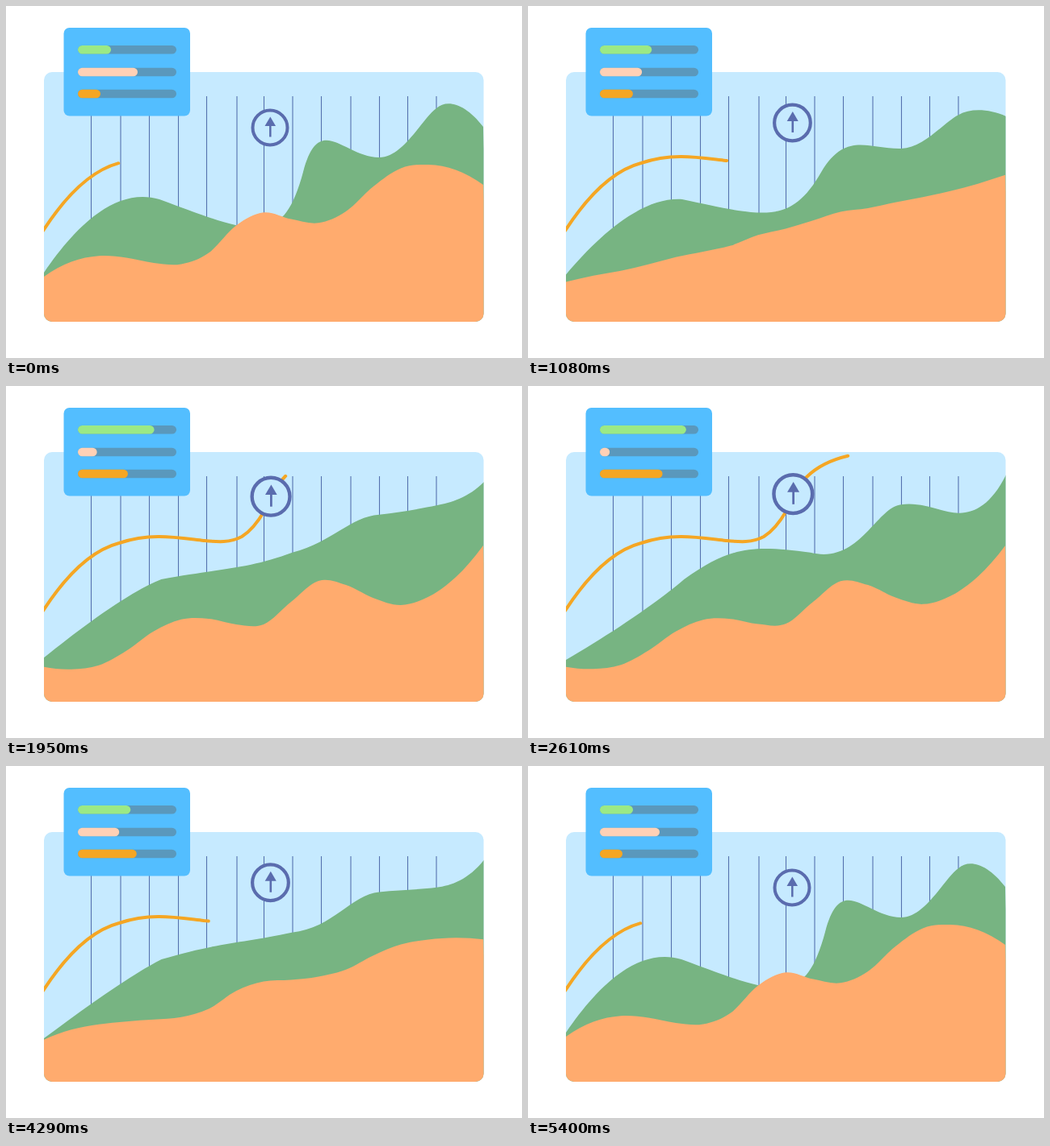
Animation, 639 px wide and 437 px high, one loop 5430 ms. Source, as an HTML page:

```html
<!DOCTYPE html>
<html lang="en">
<head>
<meta charset="utf-8">
<title>Area chart</title>
<style>
  html, body { margin: 0; width: 100%; height: 100%; overflow: hidden; background: #fff; }
  svg { display: block; width: 639px; height: 437px; }
</style>
</head>
<body>
<svg viewBox="0 0 639 437">
  <clipPath id="card"><rect x="47" y="82" width="544.5" height="310" rx="10"/></clipPath>
  <g clip-path="url(#card)">
    <rect x="47" y="82" width="545" height="310" fill="#c6eaff"/>
    <path id="grid" stroke="#5572ae" stroke-width="1.1"/>
    <path id="green" fill="#77b482"/>
    <path id="orange" fill="#ffab6e"/>
    <path id="line" fill="none" stroke="#f5a623" stroke-width="4" stroke-linecap="round"
      d="M46 279C75 234 106 204 140 195C180 182 210 188 245 192C262 193.5 277 195 292 187C305 179 313 167 320 155C328 139 336 122 345 113C357 101 373 92 397 86.5"/>
  </g>
  <g id="badge" stroke="#5a6cae" fill="#5a6cae">
    <circle r="21.5" fill="#c6eaff" stroke-width="4"/>
    <path d="M.3 11.5V-4" stroke-width="2.5"/>
    <path d="M-6.5 -2L.3 -13.5L7 -2Z" stroke="none"/>
  </g>
  <rect x="71.5" y="27" width="156.5" height="109.5" rx="7" fill="#53beff"/>
  <g id="bars"></g>
</svg>
<script>
const CYCLE = 5400, LOOP = 5430;
const $ = id => document.getElementById(id);
const mix = (a, b, w) => a + (b - a) * w;

// Rises from 0 to 1 at `peak`, then returns to 0 at the end of the cycle.
function swing(t, peak) {
  const s = Math.max(0, t < peak ? t / peak : (CYCLE - t) / (CYCLE - peak));
  return s * s * (3 - 2 * s);
}

$('grid').setAttribute('d',
  [105.5, 142, 177.5, 213.5, 248.5, 286, 319.5, 355, 390.5, 427, 462.5, 497.5, 533]
    .map(x => `M${x} 112V320`).join(''));

// Bezier points of the back hill in its two poses: x, y, x, y, ...
const hillA = [47, 331, 85, 275, 135, 224, 190, 240, 310, 285, 343, 299, 368, 206,
  388, 130, 418, 188, 462, 188, 492, 188, 515, 140, 533, 127, 546, 115, 569, 121, 591, 150];
const hillB = [47, 342, 100, 318, 160, 282, 194, 240, 238, 182, 264, 176, 346, 207,
  415, 241, 434, 143, 462, 139, 487, 134, 513, 161, 533, 164, 556, 167, 578, 151, 597, 92];

// Heights of the front hill at even steps in its two poses.
const STEP = 34;
const frontA = [336, 317.5, 310.3, 312.5, 319, 320.5, 306.5, 272.5, 256.3, 264.5, 269.3,
  255, 224, 201.5, 197, 203.5, 222];
const frontB = [349.3, 352.8, 348, 329.3, 304, 288.7, 288.3, 296.7, 297.3, 268.2, 241,
  246.7, 264.5, 274.3, 264, 238.5, 197.2];

const close = 'L600 400H47Z';

function backHill(w) {
  const p = hillA.map((v, i) => mix(v, hillB[i], w).toFixed(2));
  return `M${p.slice(0, 2)}C${p.slice(2)}${close}`;
}

function frontHill(w) {
  const y = frontA.map((v, i) => mix(v, frontB[i], w));
  const last = y.length - 1;
  const slope = i =>
    i === 0 ? (4 * y[1] - 3 * y[0] - y[2]) / 6 :
    i === last ? (3 * y[last] - 4 * y[last - 1] + y[last - 2]) / 6 :
    (y[i + 1] - y[i - 1]) / 6;
  let d = `M47 ${y[0]}`;
  for (let i = 0; i < last; i++) {
    const x = 47 + i * STEP;
    d += `C${x + STEP / 3} ${y[i] + slope(i)} ${x + STEP * 2 / 3} ${y[i + 1] - slope(i + 1)} ${x + STEP} ${y[i + 1]}`;
  }
  return d + close;
}

function addBar(y, width, fill) {
  const bar = document.createElementNS('http://www.w3.org/2000/svg', 'rect');
  const attrs = { x: 89, y: y - 5.3, width, height: 10.6, rx: 5.3, fill };
  for (const k in attrs) bar.setAttribute(k, attrs[k]);
  return $('bars').appendChild(bar);
}

const bars = [
  { y: 54.2, from: 41, to: 107, peak: 2700, fill: '#9be986' },
  { y: 82, from: 74, to: 12, peak: 2700, fill: '#ffd1b6' },
  { y: 109, from: 28, to: 90.5, peak: 3690, fill: '#f5a623' }
];
for (const b of bars) {
  addBar(b.y, 122, '#5a98bc');
  b.el = addBar(b.y, b.from, b.fill);
}

const line = $('line');
const lineLength = line.getTotalLength();

function draw(t) {
  const w = swing(t, 2700);
  $('green').setAttribute('d', backHill(swing(t, 3540)));
  $('orange').setAttribute('d', frontHill(swing(t, 2190)));
  line.setAttribute('stroke-dasharray', `${mix(0.295, 1, w) * lineLength} 999`);
  $('badge').setAttribute('transform',
    `translate(${mix(327, 328.3, w)} ${mix(151, 134, w)}) scale(${mix(1, 1.11, w)})`);
  for (const b of bars) b.el.setAttribute('width', mix(b.from, b.to, swing(t, b.peak)));
}

const start = performance.now();
function tick() {
  draw((performance.now() - start) % LOOP);
  requestAnimationFrame(tick);
}
tick();
</script>
</body>
</html>
```
